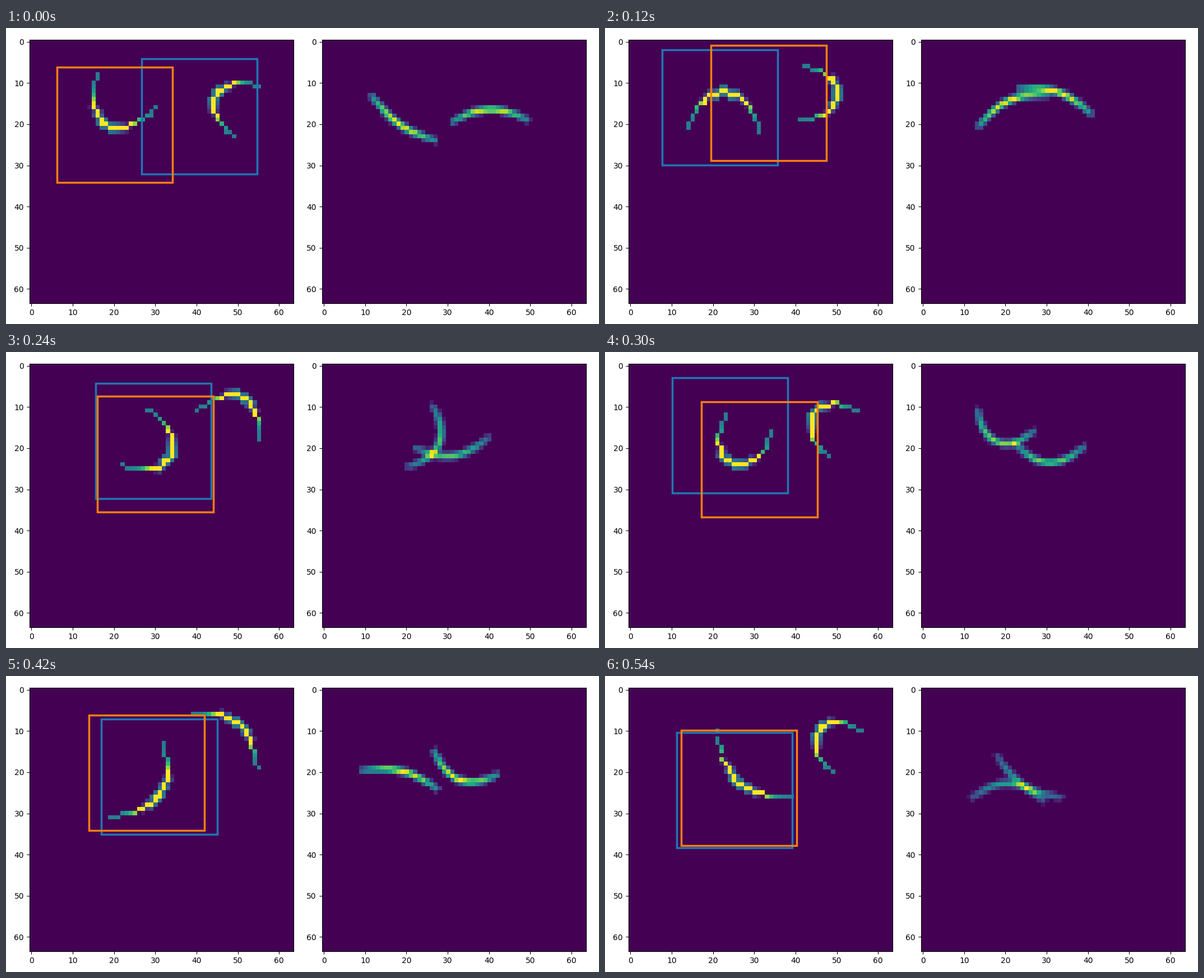
A matplotlib script that plays this animation: 1058x529 px, repeating every 600 ms.

```python
import numpy as np
import matplotlib.pyplot as plt
from matplotlib.animation import FuncAnimation
from matplotlib.patches import Rectangle

WIDTH, HEIGHT, DPI = 1058, 529, 100
GRID, BOX = 64, 28
FRAMES, INTERVAL = 10, 60
SAMPLES = 240
U = np.linspace(0, 1, SAMPLES)
ROWS, COLS = np.mgrid[:GRID, :GRID]

# Points are complex numbers x + yj in grid cells, keyed by step.
# Each stroke is a springy rod of fixed length, held at its two ends;
# it always bows to the same side, so the order of the ends matters.
LEFT_LENGTHS, RIGHT_LENGTHS = (27, 23.5), (19, 19)

LEFT_RODS = {
    0: [(16+8j, 30+16j), (55+11j, 49+23j)],
    2: [(31+22j, 14+21j), (41+19j, 42+6j)],
    3: [(29.6+26j, 13+16j), (40+22j, 47+3j)],
    5: [(23+12j, 34+16j), (55+11j, 48+22j)],
    6: [(14.2+13.8j, 39.2+23j), (38+18j, 50+3j)],
    8: [(30+32j, 18+18j), (57+6j, 42+22j)],
    9: [(21+10.5j, 39+26j), (56+10j, 49+20j)],
}
RIGHT_RODS = {
    0: [(11.6+13.3j, 26.8+24j), (49+19j, 31+19.5j)],
    2: [(30+13j, 13.5+20.5j), (40.5+17.5j, 23.2+11.5j)],
    3: [(34.7+24.3j, 19+17.5j), (22.3+21.3j, 40.2+15.2j)],
    5: [(13.2+11j, 26.7+16j), (22.3+19j, 38.8+19.8j)],
    6: [(31.7+22.6j, 13.8+17j), (29.2+16.2j, 44.5+18j)],
    8: [(22.8+25.6j, 5+22.3j), (24.6+13.7j, 38.7+23.6j)],
    9: [(18+16.3j, 33.3+26.2j), (29+27j, 12+26.2j)],
}
# Top left corners of the blue and the orange box.
CORNERS = {
    0: (26.7+4.1j, 6.15+6.1j),
    2: (7.7+1.9j, 19.45+0.85j),
    3: (21+5.6j, 14.8+6.1j),
    5: (10.15+2.85j, 17.25+8.75j),
    6: (27.55+6.1j, 10.6+5.4j),
    8: (6.4+8.1j, 17.15+6.8j),
    9: (11.2+10.3j, 12.25+9.85j),
}


def neighbours(step):
    """The key steps on both sides of a step (the same one twice on a key)."""
    return (max(k for k in CORNERS if k <= step),
            min(k for k in CORNERS if k >= step))


def halfway(ends_a, ends_b):
    """Move the centre of a rod and turn it the short way round."""
    (a, b), (c, d) = ends_a, ends_b
    centre = (a + b + c + d) / 4
    chord = (b - a) * ((d - c) / (b - a)) ** 0.5
    return centre - chord / 2, centre + chord / 2


SWING = np.sin(np.pi * (U - 0.5))
BENDS = np.linspace(0, 2.3, 100)
REACH = np.cos(np.outer(BENDS, SWING)).mean(axis=1)


def rod(ends, length):
    """Bend a rod until the distance between its ends fits the chord."""
    start, end = ends
    chord = end - start
    bend = np.interp(-abs(chord) / length, -REACH, BENDS)
    path = np.cumsum(np.exp(-1j * bend * SWING))
    path -= path[0]
    return start + path * chord / path[-1]


def rods_at(step, rods, lengths):
    before, after = neighbours(step)
    return [rod(halfway(a, b), length)
            for a, b, length in zip(rods[before], rods[after], lengths)]


def hard_strokes(paths):
    """Whole-pixel pen, thin at the tips and swelling in the middle."""
    image = np.zeros((GRID, GRID))
    width = 0.42 + 1.35 * np.sin(np.pi * U) ** 3
    for path, length in zip(paths, LEFT_LENGTHS):
        # One stamp per cell keeps diagonals a single pixel wide.
        stamps = np.linspace(0, SAMPLES - 1, int(length)).astype(int)
        x, y = (np.rint(v[stamps]).astype(int) for v in (path.real, path.imag))
        core = np.minimum(width[stamps], 1)
        side = np.maximum(width[stamps] - 1, 0) / 2
        np.maximum.at(image, (y, x), core)
        for dx, dy in ((1, 0), (-1, 0), (0, 1), (0, -1)):
            np.maximum.at(image, (y + dy, x + dx), side)
    return image


def soft_strokes(paths):
    """Smooth strokes that add up where they cross, scaled to a peak of 1."""
    image = np.zeros((GRID, GRID))
    pressure = 0.45 + 0.55 * np.sin(np.pi * U)
    cells = (COLS + 1j * ROWS)[..., None]
    for path in paths:
        ink = (np.exp(-abs(cells - path) ** 2 / 0.7) * pressure).max(axis=2)
        image += np.where(ink > 0.09, ink, 0)
    return image / image.max()


def panel(left, top=21.1, side=471.1):
    ax = fig.add_axes([left / WIDTH, 1 - (top + side) / HEIGHT,
                       side / WIDTH, side / HEIGHT])
    return ax, ax.imshow(np.zeros((GRID, GRID)), vmin=0, vmax=1,
                         cmap="viridis", interpolation="nearest")


fig = plt.figure(figsize=(WIDTH / DPI, HEIGHT / DPI), dpi=DPI, facecolor="white")
ax, left_image = panel(41.8)
_, right_image = panel(563.5)
boxes = [ax.add_patch(Rectangle((0, 0), BOX, BOX, fill=False, lw=2.5, ec=color))
         for color in ("tab:blue", "tab:orange")]


def draw(step):
    left_image.set_data(hard_strokes(rods_at(step, LEFT_RODS, LEFT_LENGTHS)))
    right_image.set_data(soft_strokes(rods_at(step, RIGHT_RODS, RIGHT_LENGTHS)))
    before, after = neighbours(step)
    for box, a, b in zip(boxes, CORNERS[before], CORNERS[after]):
        corner = (a + b) / 2
        box.set_xy((corner.real, corner.imag))
    return [left_image, right_image, *boxes]


animation = FuncAnimation(fig, draw, frames=FRAMES, interval=INTERVAL,
                          repeat=True, repeat_delay=0)
plt.show()
```
